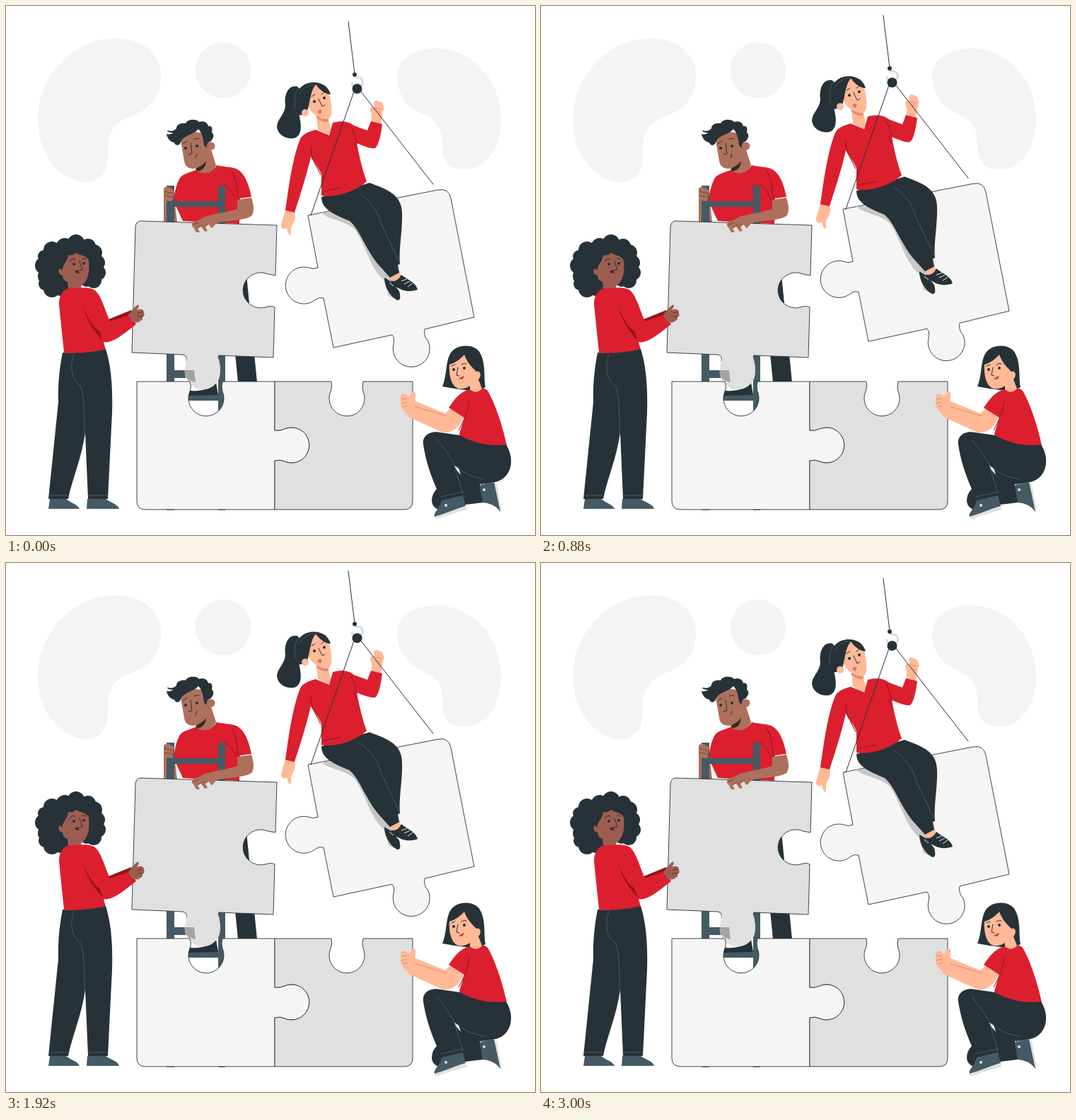
An HTML page for the animation above (3.04 s loop, 748 px wide and 748 px high).

```html
<!DOCTYPE html>
<html lang="en">
<head>
<meta charset="utf-8">
<title>Building together</title>
<style>
html, body { margin: 0; width: 100%; height: 100%; overflow: hidden; background: #fff; }
svg { display: block; width: 100%; height: 100%; }
.ink { fill: #263238; }
.red { fill: #db1f2e; }
.steel { fill: #455a64; }
.fair { fill: #ffb997; }
.tan { fill: #ad705c; }
.brown { fill: #9c5d50; }
.bg { fill: #f4f4f4; }
.light { fill: #f5f5f5; }
.gray { fill: #e0e0e0; }
.edge { stroke: #263238; stroke-width: .9; }
.line { fill: none; stroke: #263238; stroke-width: 1; stroke-linecap: round; stroke-linejoin: round; }
.seam { fill: none; stroke: #455a64; stroke-width: 1; }
.fold { fill: none; stroke: #8f1420; stroke-width: 1; }
</style>
</head>
<body>
<svg viewBox="0 0 748 748">
  <g class="bg">
    <path d="M150 46C190 44 219 66 219 98C219 128 204 146 180 154C152 164 143 180 144 205C145 235 135 249 111 249C75 247 45 208 45 160C45 100 95 47 150 46Z"/>
    <circle cx="307" cy="91" r="39.5"/>
    <path d="M553 100C553 76 575 60 608 60C660 60 700 105 700 160C700 200 680 231 648 231C625 231 617 218 617 200C618 175 612 163 590 153C567 143 553 125 553 100Z"/>
  </g>

  <!-- man on the ladder -->
  <g>
    <path class="ink" d="M325 380H340L355 532H328L318 430Z"/>
    <path class="tan" d="M223 275L238 272L242 305H223Z"/>
    <path class="red" d="M270 231C262 235 250 237 246 243C240 254 238 265 237 276L250 304L330 308L331 272L347 270C343 250 336 232 322 229C312 227 305 227 298 225C293 235 279 238 270 231Z"/>
    <path class="fold" d="M319 233C326 244 327 258 328 272L331 300M309 252C317 258 322 266 325 274"/>
    <path class="tan" d="M247 190L252 219C254 232 266 231 273 228L270 233C279 240 294 236 297 225L290 203L283 180L258 177Z"/>
    <path d="M268 230C275 227 280 223 283 219C282 230 276 234 270 233Z" fill="#3c2925"/>
    <circle class="tan" cx="290" cy="198" r="5.5"/>
    <path class="ink" d="M248 190C246 199 239 198 238 193C231 192 228 186 227 181C231 182 235 181 236 179C231 179 229 179 228 176C234 178 239 176 241 173C241 167 248 165 254 166C257 159 270 160 273 164C280 162 285 165 286 170C292 169 292 174 291 179C296 183 292 188 289 192C285 192 283 196 284 201L280 197C279 187 277 179 272 174C267 181 254 182 248 190Z"/>
    <path class="line" d="M250 195L256 191M266 188L273 187M261 194L263 209L258 210M268 215Q270 212 270 209"/>
    <circle class="ink" cx="254" cy="201" r="2"/><circle class="ink" cx="270" cy="198" r="2"/>
    <path class="steel" d="M227 254H238V276H300V254H310V713H300V558H238V713H227ZM238 284V515H300V284ZM238 526V550H300V526Z" fill-rule="evenodd"/>
    <path class="tan" d="M223 258Q225 255 230 256L237 260Q239 263 236 265Q239 268 235 270Q238 273 234 276L223 275Z"/>
    <path d="M224 262L236 265M224 268L235 270" stroke="#744737" fill="none"/>
    <path class="ink" d="M258 543C268 546 286 544 297 532L300 550L259 551Z"/>
  </g>

  <!-- raised gray piece -->
  <path class="gray" d="M258 493Q256 499 254 509A25 25 0 0 0 302 525Q305 509 299 494Z"/>
  <path d="M253 515H266L268 532C257 530 252 525 253 515Z" fill="#a3a3a3"/>
  <path class="gray edge" d="M191 304L383 310L381 381Q375 380 370 379A25 25 0 1 0 367 426Q375 423 380 426L378 497L301 494Q299 499 300 504L255 503Q257 494 250 493L178 490L183 312Q184 304 191 304Z" stroke-dasharray="none"/>
  <path class="gray" d="M256 497L300 497L302 507L254 508Z"/>
  <path class="tan" d="M327 274L347 271C351 283 351 292 347 297C338 303 312 304 300 306C294 308 295 313 290 314L287 309L282 312L285 318L281 319L276 312L271 314L274 320L269 320L265 313C261 310 263 305 267 304C272 305 278 298 284 297C302 293 318 290 327 287Z"/>
  <path d="M265 309L273 306M271 314L278 309M279 313L284 308" stroke="#744737" fill="none"/>

  <!-- base pieces -->
  <path class="light edge" d="M185 531H260Q263 538 260 545A25 25 0 1 0 306 545Q304 538 306 531H380V600Q388 601 394 598A25 25 0 1 1 394 644Q388 641 380 643V712H197Q185 712 185 700Z"/>
  <path class="gray edge" d="M380 531H460Q462 538 459 545A25 25 0 1 0 505 545Q503 538 505 531H575V700Q575 712 563 712H380V643Q388 641 394 644A25 25 0 1 0 394 598Q388 601 380 600Z"/>

  <!-- woman on the left -->
  <g>
    <g class="ink" id="curls"></g>
    <path class="brown" d="M84 352C91 343 110 343 116 355C119 370 118 388 107 395C105 399 106 401 110 403C102 407 93 405 88 400L87 390Q80 388 80 381C72 380 73 368 80 371Z"/>
    <path class="ink" d="M79 374C80 365 87 362 88 352C92 354 96 351 99 349C105 353 112 352 117 359L116 341L95 337L78 348L74 368Z"/>
    <path class="line" d="M90 361Q94 356 98 358M108 357L113 358M104 361L108 373L103 374M98 376Q101 374 104 378"/>
    <circle class="ink" cx="96" cy="365" r="2"/><circle class="ink" cx="110" cy="364" r="2"/>
    <path d="M97 375L102 373L103 377L100 378Z" fill="#4f241f"/>
    <path d="M145 443L177 430L183 438L148 450Z" fill="#93141f"/>
    <path class="red" d="M92 399C82 399 75 408 75 422L82 490C100 493 125 489 141 486L138 475C150 478 167 463 184 450L176 436L147 446C140 430 135 411 127 403C118 396 105 399 92 399Z"/>
    <path d="M109 425C115 440 122 453 132 460L137 473C127 463 115 447 109 425Z" fill="#93141f"/>
    <path class="brown" d="M173 437C178 430 183 424 187 422L188 425L185 430C191 427 196 430 195 434Q197 438 193 440Q194 444 190 445C187 449 181 447 178 446Z"/>
    <path d="M186 434L193 433M186 439L193 439" stroke="#633229" fill="none"/>
    <path class="ink" d="M80 490C100 492 125 489 141 485C149 510 151 540 150 575L144 697H116L112 603C107 640 93 670 88 697H60L74 560C73 535 76 510 80 490Z"/>
    <path class="seam" d="M96 492C90 510 92 528 105 537C111 550 111 580 111 608M62 692H87M116 692H143"/>
    <path class="steel" d="M62 697H85C92 703 102 705 104 711H60ZM115 697H141C147 702 158 704 160 711H114Z"/>
  </g>

  <!-- woman on the right -->
  <g>
    <path class="ink" d="M617 538C624 522 621 500 630 489C640 477 663 478 670 490C679 505 675 526 678 539Q668 545 650 543L634 541Z"/>
    <path class="fair" d="M627 507C626 520 629 538 640 541C646 542 652 540 656 537L656 548C663 550 671 547 673 541L668 528C673 523 671 514 665 517C658 510 652 504 648 493C642 500 634 505 627 507Z"/>
    <path class="line" d="M630 509L635 507M644 507Q648 504 651 506M639 511L637 522L641 523M641 527Q645 528 647 524"/>
    <circle class="ink" cx="633" cy="514" r="2"/><circle class="ink" cx="648" cy="512" r="2"/>
    <path d="M642 526L647 523L646 528Z" fill="#c9302c"/>
    <path class="fair" d="M572 556L621 576L631 567L648 581L641 592C635 601 625 605 615 602L567 580L572 568Z"/>
    <path d="M577 566L624 580" stroke="#e58b69" fill="none"/>
    <path class="fair" d="M558 551Q560 547 566 549L570 553L575 545Q580 545 579 551L578 567L570 578L564 575L558 566Z"/>
    <path d="M559 556L567 555M559 562L567 560M561 567L568 565" stroke="#e58b69" fill="none"/>
    <path class="red" d="M656 542C641 545 633 558 626 568L648 582L641 605C645 620 680 623 708 621C703 596 691 560 681 544C675 538 672 542 671 543Q664 549 656 542Z"/>
    <path class="fold" d="M655 558C654 568 651 577 646 588L640 600"/>
    <path class="ink" d="M590 620C588 606 602 600 614 603L642 607C664 620 690 623 707 620C718 637 717 660 700 670C690 675 680 675 670 676L675 702L650 705L640 708C622 718 603 714 602 700Q602 690 609 683C599 660 593 640 590 620Z"/>
    <path d="M634 650L640 653L643 663L637 656Z" fill="#fff"/>
    <path class="seam" d="M609 613C619 624 627 637 635 650C646 660 660 667 677 669M614 694L647 687M671 677L690 673M635 653L646 690"/>
    <path class="gray" d="M607 721L650 708L652 712Q630 718 610 725L605 724ZM690 674L694 676L701 714L698 716Z"/>
    <path class="steel" d="M616 699L646 692L650 707C636 711 621 718 606 722C604 716 613 712 616 699ZM670 678L690 673L699 715Q690 703 674 702Z"/>
    <circle cx="622" cy="706" r="2" fill="#dbe2e5"/><circle cx="676" cy="684" r="2" fill="#dbe2e5"/>
  </g>

  <!-- hoisted piece and rider -->
  <g id="lift">
    <path class="light edge" d="M427 296L441 370Q434 373 428 370A26 26 0 1 0 438 415Q443 411 449 413L463 483L546 465Q550 470 548 478A26 26 0 1 0 597 474Q590 467 592 457L662 440L629 272Q626 257 611 260Z"/>
    <path d="M446 292C453 302 481 303 494 317C509 340 516 374 535 388L541 410L554 416L552 380L500 290Z" fill="#c7c7c7"/>
    <path class="fair" d="M542 380L556 374L559 383L546 391Z"/>
    <path class="ink" d="M446 270C446 288 465 295 486 304C500 316 508 343 525 364L543 384L556 377L554 366L557 365C555 345 561 315 560 293C560 265 535 258 514 250Z"/>
    <path class="seam" d="M499 264C517 278 526 291 531 309L556 362"/>
    <path class="ink" d="M535 384L545 390L556 403C558 411 558 416 554 416C544 412 535 398 535 384ZM544 388C550 391 556 386 559 380C566 386 580 391 582 401C574 404 564 404 557 400Q548 397 544 388Z"/>
    <path d="M559 389L567 386M563 393L571 389M568 397L575 392M542 391L548 396" stroke="#fff" stroke-width=".9"/>
    <path class="fair" d="M395 288L408 290C411 301 406 307 403 313L403 322Q401 326 399 321L397 314C391 318 387 312 390 306Z"/>
    <path class="fair" d="M517 166L517 152Q513 147 517 142L521 143L520 136Q523 132 527 135Q533 136 533 140Q536 144 533 149L530 168Z"/>
    <path d="M522 144L531 146M523 149L530 151" stroke="#e58b69" fill="none"/>
    <path class="ink" d="M412 114C399 111 393 126 395 140C395 153 383 160 383 171C385 185 401 190 410 186C420 180 417 165 414 152C408 140 408 125 415 117Z"/>
    <path class="fair" d="M426 128C424 142 432 151 439 155L441 175L456 183L459 176L456 160C462 155 461 143 458 128L452 112L433 110Z"/>
    <path d="M439 155Q447 161 456 160L455 164Q445 164 439 158Z" fill="#e58b69"/>
    <path class="red" d="M438 175L457 183L462 165C477 161 486 164 492 169L511 176L516 163L532 167C530 181 528 195 522 201C514 202 504 197 496 194C500 215 505 235 510 248C495 262 465 272 446 268L446 238C442 228 436 222 431 213C425 240 415 270 408 292L395 289C399 260 405 215 416 188C420 180 430 177 438 175Z"/>
    <path class="fold" d="M431 199Q431 206 433 215L445 239M488 171Q495 183 496 196M449 262L474 257M496 203L491 193"/>
    <path class="ink" d="M409 152C402 138 408 118 424 110C441 104 456 112 459 125C450 124 443 118 438 111C430 120 430 137 426 149C421 155 413 156 409 152Z"/>
    <path class="seam" d="M412 118Q406 130 409 145M414 125Q422 113 435 110" stroke-width=".7"/>
    <circle class="fair" cx="423" cy="151" r="5"/>
    <path class="line" d="M432 128L437 125M446 125L451 121M442 131L447 142L451 140"/>
    <circle class="ink" cx="436" cy="135" r="2"/><circle class="ink" cx="450" cy="130" r="2"/>
    <path d="M441 149Q443 146 446 148L445 152Q441 152 441 149Z" fill="#ee7467" stroke="#b6493f" stroke-width=".6"/>
    <path class="line" d="M484 22L493 96"/>
    <path class="line" stroke-width=".8" d="M492 121L431 296M502 121L604 252"/>
    <path d="M493 101C505 99 508 109 500 115M489 108Q489 114 495 115" fill="none" stroke="#dcdcdc" stroke-width="3"/>
    <circle class="ink" cx="493" cy="97" r="3"/>
    <circle class="ink" cx="496.500" cy="117" r="7"/>
  </g>
</svg>
<script>
const LOOP = 3040, STEP = 1000 / 24, LAST = 72, RISE = 15;
const lift = document.getElementById('lift');

// x, y, radius of each curl
const curls = [
  [99, 335, 12], [83, 340, 12], [116, 340, 11], [124, 349, 12], [129, 363, 11],
  [130, 377, 11], [124, 388, 11], [114, 388, 9], [65, 345, 12], [54, 354, 9],
  [53, 367, 12], [58, 382, 13], [55, 393, 9], [65, 400, 12], [78, 397, 13],
  [73, 365, 22], [98, 351, 20], [74, 384, 16], [113, 365, 17]
];
document.getElementById('curls').innerHTML =
  curls.map(([x, y, r]) => `<circle cx="${x}" cy="${y}" r="${r}"/>`).join('');

const start = performance.now();
function draw(now) {
  const t = Math.max(0, now - start) % LOOP;
  const step = Math.min(LAST, Math.floor((t + 4) / STEP));
  const y = -RISE * (1 - Math.abs(1 - 2 * step / LAST));
  lift.setAttribute('transform', `translate(0 ${y})`);
  requestAnimationFrame(draw);
}
draw(start);
</script>
</body>
</html>
```
